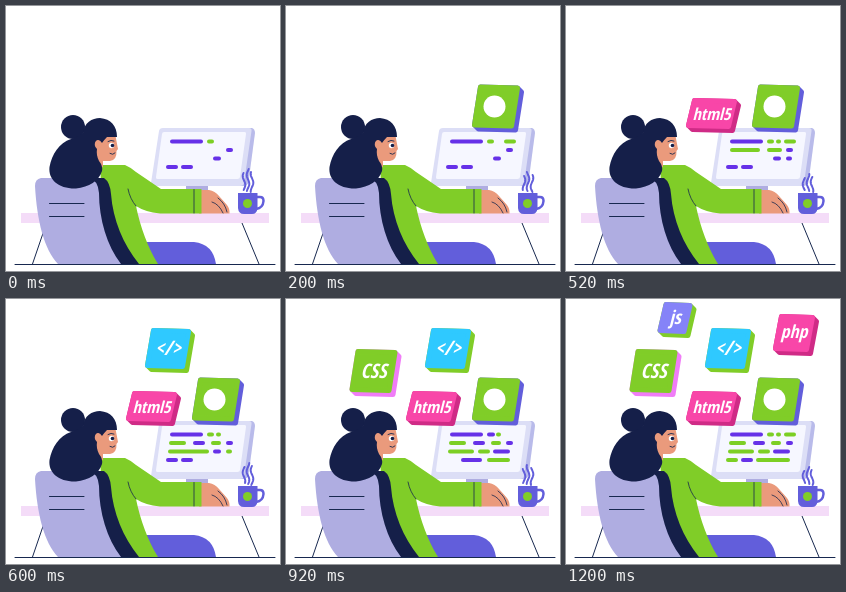
Animation, 274 px wide and 265 px high, one loop 1400 ms. Source, as an HTML page:

```html
<!DOCTYPE html>
<html lang="en">
<head>
<meta charset="utf-8">
<title>Coding at a desk</title>
<style>
  html, body { margin: 0; width: 100%; height: 100%; overflow: hidden; background: #fff; }
  svg { display: block; width: 100vw; height: 100vh; }
  text { font-family: "Open Sans Condensed", "Noto Sans Condensed", Lato, sans-serif; font-style: italic; font-weight: 700; fill: #fff; text-anchor: middle; }
  .line { fill: none; stroke: #17284f; stroke-linecap: round; }
  .navy { fill: #151f49; }
  .green { fill: #80cd28; }
  .skin { fill: #ea9a7c; }
  .lilac { fill: #afade1; }
  .violet { fill: #625edb; }
  #code path { fill: none; stroke-width: 4; stroke-linecap: round; }
  #steam path { fill: none; stroke: #625edb; stroke-width: 2; stroke-linecap: round; }
  .tile path { stroke-width: 5; stroke-linejoin: round; }
</style>
</head>
<body>
<svg viewBox="0 0 274 265" preserveAspectRatio="none">
  <!-- monitor -->
  <path class="lilac" d="M180 178H202V186H180Z"/>
  <path fill="#b9bbea" d="M242 122H246Q249 123 249 127L242.500 176Q241.500 180 237 180H228Z"/>
  <path fill="#dcdef6" d="M157 122H243Q246 122 245.500 125L238 177Q237.500 180 234 180H148Q144.500 180 145 177L153 125Q153.500 122 157 122Z"/>
  <path fill="#f6f7ff" d="M158 126H238.500Q240.500 126 240 128L234 171Q233.700 173 231.500 173H151.500Q149.500 173 150 171L156 128Q156.300 126 158 126Z"/>
  <g id="code"></g>

  <!-- desk -->
  <path class="line" d="M40.500 217L26.500 258M236 217L253 258"/>
  <path fill="#f4dcf8" d="M15 207H263V217H15Z"/>

  <!-- legs, arm and hand -->
  <path class="violet" d="M138 236H188Q207 238 210 258H138Z"/>
  <path class="skin" d="M193 184H203Q209 185 213 190L221 199Q224 203 223.500 207.500H193Z"/>
  <path class="line" stroke-width=".8" d="M206 196Q213 198 217 207M212 192Q219 197 221 206"/>
  <path class="green" d="M94 159H119Q124 161 130 166L155 183H195.500V207.500H154Q139 206 130 200C134 220 142 242 152 258H118L95 176Z"/>
  <path class="line" stroke-width=".8" d="M122 183Q124 193 130 200M188 183.500V207"/>

  <!-- chair -->
  <path class="navy" d="M80 172H98Q104 176 105 188C107 214 117 238 133 258H104Z"/>
  <path class="lilac" d="M35 172H83Q92 174 93 187C93 213 101 240 115 258H52C38 243 31 215 29 180Q29 173 35 172Z"/>
  <path class="line" d="M43.500 197.500H78M43.500 210.500H78"/>

  <!-- head -->
  <path class="skin" d="M88 130H109.500L112 143L110.500 145Q111 154 104 155L97 155V161H84Z"/>
  <circle class="navy" cx="67" cy="121" r="12"/>
  <path class="navy" d="M77 127C78 117 86 112 94 112C105 113 111 120 111 131H101Q98 134 96 137Q93 132 90 135Q87 139 91 143Q90 149 93 155Q97 160 96 165C93 175 83 181 70 182.500C53 183 42 174 43.500 161C46 148 53 137 65 133Q72 131 77 127Z"/>
  <path class="skin" d="M96 139Q92 132 89.500 136Q88 141 93 143Z"/>
  <circle cx="105.500" cy="139.500" r="2.700" fill="#fff"/>
  <circle class="navy" cx="106.500" cy="139.500" r="1.800"/>
  <path class="line" stroke-width=".9" d="M102 135.500Q105 133.500 108 135M104 147.500Q107 149.500 109 147"/>

  <!-- mug -->
  <g id="steam"></g>
  <path fill="none" stroke="#625edb" stroke-width="2.500" d="M250 191H254Q257.500 191 257.500 195Q257 202 250 203"/>
  <path class="violet" d="M232 187H251.500V202Q251 208 246 208H238Q232.500 208 232 202Z"/>
  <circle class="green" cx="241.500" cy="197.500" r="4.500"/>

  <path class="line" stroke-linecap="butt" d="M9 258.500H269"/>
  <g id="tiles"></g>
</svg>
<script>
const STEP = 200, STEPS = 7;
const NS = 'http://www.w3.org/2000/svg';
const $ = id => document.getElementById(id);

function add(parent, tag, attrs, text) {
  const el = document.createElementNS(NS, tag);
  for (const key in attrs) el.setAttribute(key, attrs[key]);
  if (text) el.textContent = text;
  return parent.appendChild(el);
}

// One character per step: 1 shows the element, 0 hides it.
function show(el, mask) {
  const frames = [...mask, mask[STEPS - 1]].map((on, i) => ({
    opacity: +on, offset: i / STEPS, easing: 'step-end'
  }));
  el.animate(frames, { duration: STEP * STEPS, iterations: Infinity }).startTime = 0;
}

const from = n => '0'.repeat(n) + '1'.repeat(STEPS - n);

// Lines of code: row, left, right, colour, mask
const P = '#6631e8', G = '#7ccf24';
[
  [0, 166, 195, P, '1111111'], [0, 203, 206, G, '1111011'], [0, 220, 228, G, '0110001'],
  [0, 212, 213, G, '0011111'], [0, 203, 207, P, '0000100'],
  [1, 222, 225, P, '1111111'], [1, 166, 192, G, '0010000'], [1, 203, 214, G, '0010000'],
  [1, 165, 178, G, '0001111'], [1, 189, 197, P, '0001111'], [1, 207, 213, G, '0001111'],
  [2, 209, 213, P, '1111010'], [2, 222, 224, P, '0010000'],
  [2, 164, 201, G, '0001010'], [2, 222, 224, G, '0001010'],
  [2, 164, 186, G, '0000101'], [2, 194, 202, G, '0000101'], [2, 209, 222, P, '0000101'],
  [3, 162, 170, P, '1111010'], [3, 177, 185, P, '1111011'],
  [3, 162, 170, G, '0000001'], [3, 177, 194, P, '0000100'],
  [3, 203, 222, G, '0000100'], [3, 192, 222, G, '0000001']
].forEach(([row, a, b, stroke, mask]) =>
  show(add($('code'), 'path', { d: `M${a} ${135.5 + row * 8.5}H${b}`, stroke }), mask));

// Steam: three wavy strands with a new phase each step
const tops = [163, 166, 168, 164, 166, 165, 168];
function strand(x, top, bottom, phase) {
  let d = '';
  for (let y = top; y <= bottom; y++)
    d += `${d ? 'L' : 'M'}${(x + 1.3 * Math.sin(y * 0.36 + phase)).toFixed(1)} ${y}`;
  return d;
}
tops.forEach((top, i) => {
  const g = add($('steam'), 'g', {});
  [[238, 4], [242, 0], [246, 3]].forEach(([x, drop], k) =>
    add(g, 'path', { d: strand(x, top + drop, 184 + k, i * 1.7 + 0.4 * k) }));
  show(g, [...tops].map((_, n) => +(n === i)).join(''));
});

// Tiles: left, top, width, height, face, side, label, size, baseline, first step
const SLANT = 6;
[
  [186, 78.5, 48, 44, '#80cd28', '#625edb', '', 0, 0, 1],
  [120, 92, 51, 31, '#f846a8', '#cf2b86', 'html5', 16.5, 114, 2],
  [139, 29, 46, 41, '#2fc9ff', '#80cd28', '</>', 20, 56, 3],
  [63.5, 50, 48, 44, '#80cd28', '#f07df7', 'CSS', 20, 79, 4],
  [207, 15, 42, 38, '#f846a8', '#cf2b86', 'php', 18, 39, 5],
  [91.5, 3, 35, 32, '#8583f8', '#80cd28', 'js', 19, 25, 6]
].forEach(([x, y, w, h, face, side, label, size, base, first]) => {
  const g = add($('tiles'), 'g', { class: 'tile' });
  const l = x + 2.5, r = x + w - 2.5, t = y + 2.5, b = y + h - 2.5;
  const front = `M${l + SLANT} ${t}L${r} ${t + 1}L${r - SLANT} ${b}L${l} ${b - 1}Z`;
  const depth = `M${l} ${b - 1}L${l + SLANT} ${t}L${r} ${t + 1}L${r + 4} ${t + 5}L${r + 4 - SLANT} ${b + 4}L${l + 4} ${b + 3}Z`;
  add(g, 'path', { d: depth, fill: side, stroke: side });
  add(g, 'path', { d: front, fill: face, stroke: face });
  if (label) add(g, 'text', { x: x + w / 2, y: base, 'font-size': size }, label);
  else add(g, 'circle', { cx: 208.5, cy: 100.5, r: 11, fill: '#fff' });
  show(g, from(first));
});
</script>
</body>
</html>
```
